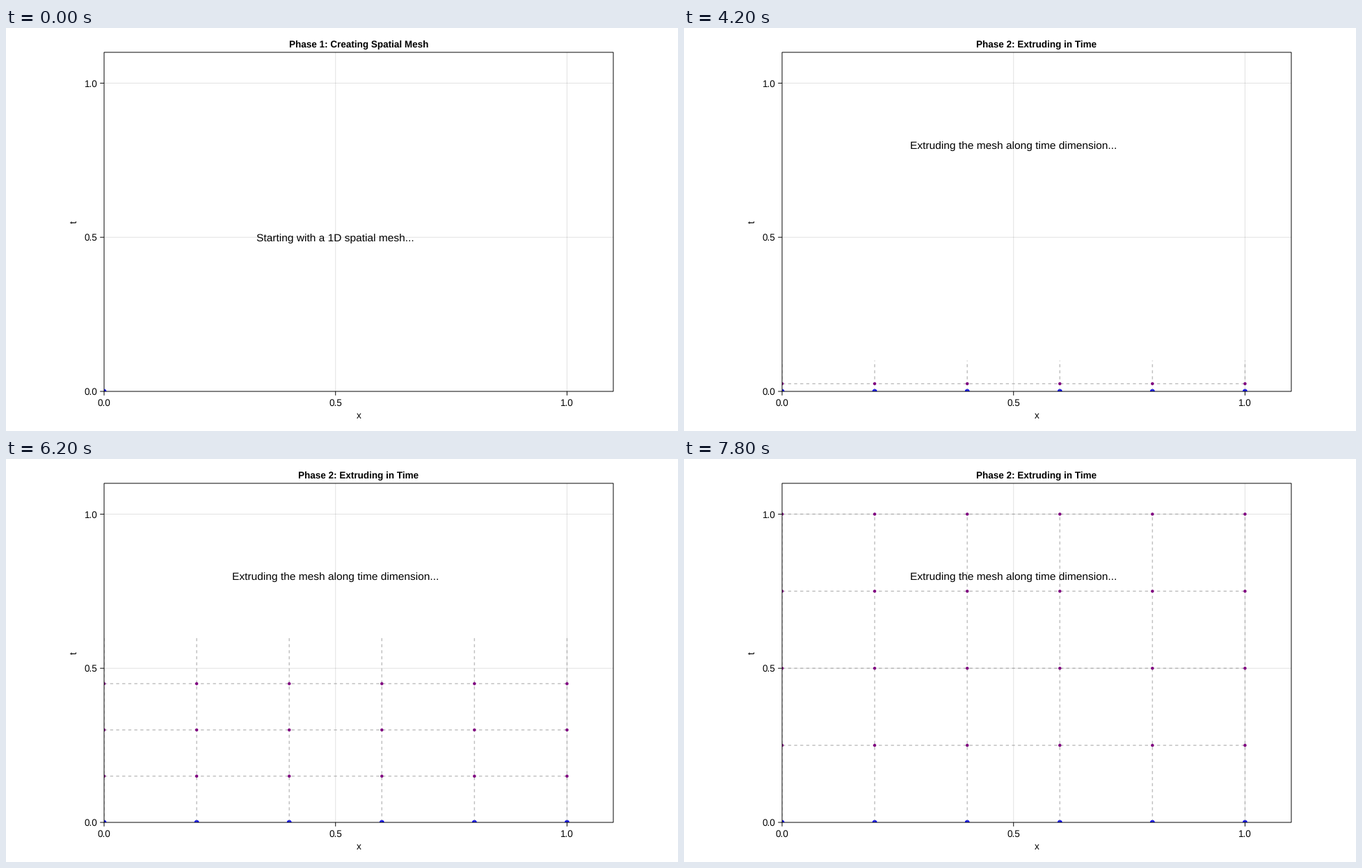
Write a matplotlib script that moves like this. It is 966x580 px and loops after 8000 ms.

```python
import matplotlib.pyplot as plt
from matplotlib.animation import FuncAnimation
from matplotlib.patches import Circle, Rectangle

plt.rcParams["font.family"] = "Liberation Sans"
plt.rcParams["text.hinting"] = "no_hinting"

W, H, DPI = 966, 580, 100
PT = 72 / DPI                # points per pixel
UNIT = 0.966                 # pixels per layout unit
LEFT, RIGHT, TOP, BOTTOM = 141, 873, 35, 523
STEPS = 20                   # frames in each phase
COLS, ROWS = 6, 4

fig = plt.figure(figsize=(W / DPI, H / DPI), dpi=DPI, facecolor="white")
ax = fig.add_axes([0, 0, 1, 1])
ax.set_xlim(0, W)
ax.set_ylim(H, 0)
ax.axis("off")


def px(x):
    return LEFT + x * (RIGHT - LEFT) / 1.1


def py(t):
    return BOTTOM - t * (BOTTOM - TOP) / 1.1


def line(xs, ys, color="black", width=1, **kw):
    return ax.plot(xs, ys, color=color, lw=width * UNIT * PT, snap=False,
                   solid_capstyle="butt", dash_capstyle="butt", **kw)[0]


def label(x, y, s, size=14, ha="center", **kw):
    return ax.text(x, y, s, fontsize=size * UNIT * PT, ha=ha,
                   va="baseline", zorder=8, **kw)


def dot(x, y, diameter, color, z):
    d = Circle((x, y), diameter / 2, fc=color, ec="none", zorder=z)
    ax.add_patch(d)
    d.set_clip_path(frame)
    return d


def dashed():
    d = line([], [], "gray", 1.5, alpha=0.5, ls=(0, (3, 3)), zorder=4)
    d.set_clip_path(frame)
    return d


# Axis frame, grid, ticks and labels
frame = Rectangle((LEFT, TOP), RIGHT - LEFT, BOTTOM - TOP, fc="none",
                  ec="black", lw=UNIT * PT, snap=False, zorder=7)
ax.add_patch(frame)
for v in (0, 0.5, 1):
    x, y = px(v), py(v)
    if v:
        line([x, x], [TOP, BOTTOM], alpha=0.12, zorder=1)
        line([LEFT, RIGHT], [y, y], alpha=0.12, zorder=1)
    line([x, x], [BOTTOM, BOTTOM + 5.8], zorder=7)
    line([LEFT - 5.8, LEFT], [y, y], zorder=7)
    label(x, 543.7, f"{v:.1f}")
    label(131.4, y + 5, f"{v:.1f}", ha="right")

mid = (LEFT + RIGHT) / 2
label(mid, 562, "x")
label(104.5, (TOP + BOTTOM) / 2, "t", rotation=90, ha="right").set_va("center")
title = label(mid, 28, "", weight="bold")
note = label(px(0.5), 0, "", size=16)

# Mesh parts
mesh = [px(i / (COLS - 1)) for i in range(COLS)]
base = [dot(x, BOTTOM, 6.8, "blue", 3) for x in mesh]
columns = [dashed() for _ in mesh]
levels = [dashed() for _ in range(ROWS)]
nodes = [[dot(x, BOTTOM, 4.4, "purple", 5) for x in mesh]
         for _ in range(ROWS)]


def shown(k, n):
    """Parts out of n visible at step k, rounded up."""
    return -(-k * n // STEPS)


def set_note(s, t):
    note.set_text(s)
    note.set_y(py(t) + 5.8)


def update(i):
    extruding = i >= STEPS
    k = i % STEPS + 1
    height = k / STEPS if extruding else 0

    if extruding:
        title.set_text("Phase 2: Extruding in Time")
        set_note("Extruding the mesh along time dimension...", 0.8)
    else:
        title.set_text("Phase 1: Creating Spatial Mesh")
        set_note("Starting with a 1D spatial mesh...", 0.5)

    count = COLS if extruding else shown(k, COLS)
    for j, d in enumerate(base):
        d.set_visible(j < count)

    for x, c in zip(mesh, columns):
        c.set_visible(extruding)
        c.set_data([x, x], [BOTTOM, py(height)])

    rows = shown(k, ROWS) if extruding else 0
    for j in range(ROWS):
        y = py(height * (j + 1) / ROWS)
        levels[j].set_visible(j < rows)
        levels[j].set_data([mesh[0], mesh[-1]], [y, y])
        for x, d in zip(mesh, nodes[j]):
            d.set_visible(j < rows)
            d.center = (x, y)
    return []


anim = FuncAnimation(fig, update, frames=2 * STEPS, interval=200,
                     init_func=lambda: update(0), repeat=True, repeat_delay=0)
plt.show()
```
